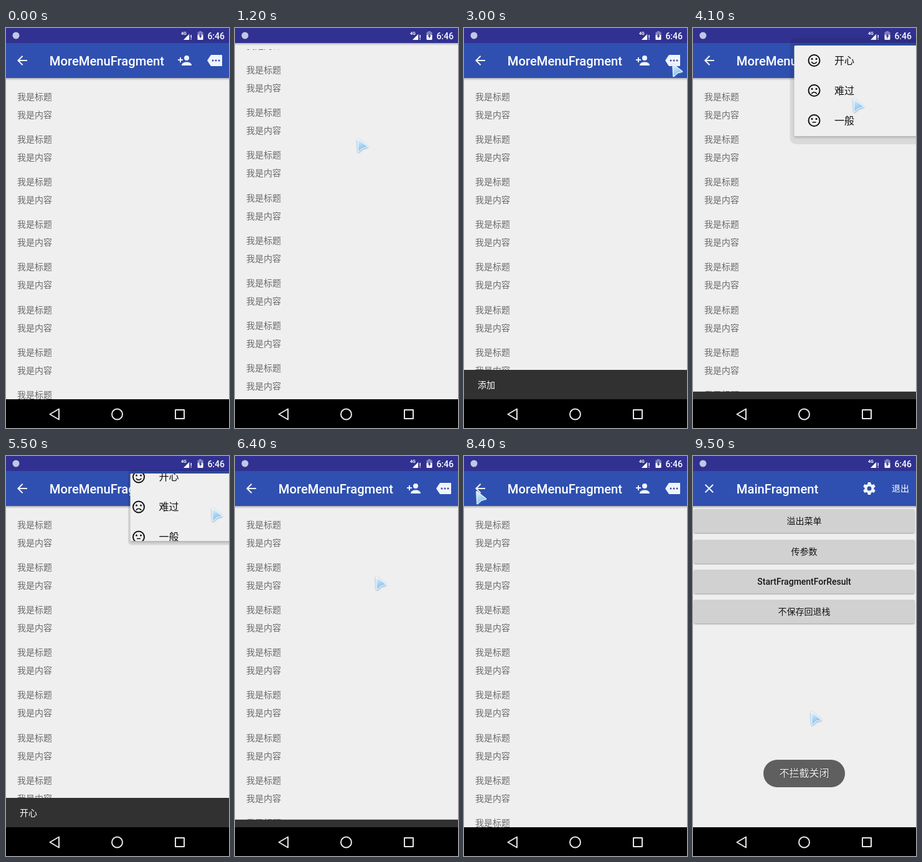
An HTML page with a canvas that plays this animation: 358 px wide and 640 px high, repeating every 9600 ms.

```html
<!DOCTYPE html>
<html lang="zh-CN">
<head>
<meta charset="utf-8">
<style>
html, body { margin: 0; width: 358px; height: 640px; overflow: hidden; background: #000; }
canvas { display: block; }
</style>
</head>
<body>
<canvas id="stage" width="358" height="640"></canvas>
<script>
const g = document.getElementById('stage').getContext('2d');
const LOOP = 9600, STEP = 100;
const FAMILY = 'px Roboto, "Noto Sans CJK SC", "Noto Sans CJK", sans-serif';
const BLUE = '#2f50b0', INDIGO = '#303190', PAPER = '#efefef', LIGHT = '#f1f3fa', INK = '#111';
const BAR = 56, LIST_END = 861, SNACK_HEIGHT = 47;

const MESSAGES = [
  { label: '添加', from: 2400, to: 3900 },
  { label: '开心', from: 4700, to: 6200 },
  { label: '一般', from: 6500, to: 8100 }
];
const MENUS = [{ from: 3800, to: 4700 }, { from: 5500, to: 6200 }];

// Where the pointer rests: arrival, departure, x, y
const STOPS = [
  [100, 300, 200, 430], [1200, 1200, 197, 178], [1800, 1800, 262, 1], [2200, 2400, 281, 53],
  [3000, 3900, 335, 58], [4100, 4200, 258, 114], [4500, 4700, 241, 45], [5200, 5500, 331, 84],
  [5900, 6200, 243, 146], [6800, 7000, 180, 330], [7300, 7500, 173, 226], [8300, 8900, 20, 57],
  [9500, 9600, 190, 410]
];

const span = (t, a, b) => Math.min(1, Math.max(0, (t - a) / (b - a)));
const ease = (t, a, b) => { const u = span(t, a, b); return u * u * (3 - 2 * u); };
// Rises at a, falls at b
const pulse = (t, a, b, rise, fall = rise) => ease(t, a, a + rise) - ease(t, b, b + fall);

const scrollAt = t => LIST_END * pulse(t, 300, 1300, 700, 600) + BAR * pulse(t, 7000, 7500, 300);

function rect(x, y, w, h, color, radius = 0) {
  g.fillStyle = color;
  g.beginPath();
  g.roundRect(x, y, w, h, radius);
  g.fill();
}

function disc(x, y, r, color) {
  g.fillStyle = color;
  g.beginPath();
  g.arc(x, y, r, 0, 7);
  g.fill();
}

function ring(x, y, r) {
  g.beginPath();
  g.arc(x, y, r, 0, 7);
  g.stroke();
}

function line(points, close) {
  g.beginPath();
  points.forEach(([x, y]) => g.lineTo(x, y));
  if (close) g.closePath();
  g.stroke();
}

function poly(points, color) {
  g.fillStyle = color;
  g.beginPath();
  points.forEach(([x, y]) => g.lineTo(x, y));
  g.closePath();
  g.fill();
}

// y is the visual middle; baselines sit on whole pixels
function text(s, x, y, size, color, weight = 400, align = 'left') {
  g.font = weight + ' ' + size + FAMILY;
  g.textAlign = align;
  g.fillStyle = color;
  g.fillText(s, x, Math.floor(y + size * .37));
}

function clipped(x, y, w, h, draw) {
  g.save();
  g.beginPath();
  g.rect(x, y, w, h);
  g.clip();
  draw();
  g.restore();
}

// Icons are drawn around their centre
const ICONS = {
  back() {
    line([[-6, 0], [8, 0]]);
    line([[.7, -7.3], [-6.6, 0], [.7, 7.3]]);
  },
  close() {
    line([[-6.3, -6.3], [6.3, 6.3]]);
    line([[6.3, -6.3], [-6.3, 6.3]]);
  },
  addPerson() {
    line([[-11, -1], [-3, -1]]);
    line([[-7, -5], [-7, 3]]);
    disc(3, -4, 4, LIGHT);
    g.beginPath();
    g.moveTo(-5, 8);
    g.bezierCurveTo(-6, 0.5, 12, 0.5, 11, 8);
    g.fill();
  },
  tag() {
    const shape = [[-10.8, 0], [-5.5, -8], [11, -8], [11, 8], [-5.5, 8]];
    g.lineJoin = 'round';
    poly(shape, LIGHT);
    line(shape, true);
    for (let x = -3; x <= 7; x += 5) disc(x, 0, 1.5, BLUE);
  },
  gear() {
    for (let i = 0; i < 6; i++) {
      poly([[-3, -6], [-2.2, -10], [2.2, -10], [3, -6]], LIGHT);
      g.rotate(Math.PI / 3);
    }
    g.lineWidth = 4;
    ring(0, 0, 5.5);
  }
};

function icon(name, x, y) {
  g.save();
  g.translate(x, y);
  g.strokeStyle = g.fillStyle = LIGHT;
  g.lineWidth = 2;
  g.lineJoin = 'miter';
  ICONS[name]();
  g.restore();
}

function face(x, y, mood) {
  g.strokeStyle = INK;
  g.lineWidth = 2;
  ring(x, y, 9);
  disc(x - 3.5, y - 2.5, 1.5, INK);
  disc(x + 3.5, y - 2.5, 1.5, INK);
  g.lineWidth = 1.6;
  g.beginPath();
  if (mood > 0) g.arc(x, y + .2, 4.6, .45, Math.PI - .45);
  else if (mood < 0) g.arc(x, y + 7.4, 4.6, Math.PI + .45, -.45);
  else { g.moveTo(x - 3, y + 2.8); g.lineTo(x + 3, y + 2.8); }
  g.stroke();
}

function toolbar(top, main) {
  const edge = top + BAR, middle = top + BAR / 2;
  const shade = g.createLinearGradient(0, edge, 0, edge + 4);
  shade.addColorStop(0, 'rgba(0,0,0,.25)');
  shade.addColorStop(1, 'rgba(0,0,0,0)');
  rect(0, edge, 358, 4, shade);
  rect(0, top, 358, BAR, BLUE);
  icon(main ? 'close' : 'back', 26, middle);
  text(main ? 'MainFragment' : 'MoreMenuFragment', 69.8, middle + 1, 20.2, '#fff', 500);
  if (main) {
    icon('gear', 283, middle);
    text('退出', 319, middle, 14, '#fff');
  } else {
    icon('addPerson', 287, middle);
    icon('tag', 335, middle);
  }
}

function listPage(t) {
  const scroll = scrollAt(t), hidden = Math.min(BAR, scroll);
  clipped(0, 90 - hidden, 358, 594, () => {
    for (let i = 0; i < 20; i++) {
      const y = 110 - scroll + i * 68.2;
      text('我是标题', 18, y, 14, '#6c6c6c');
      text('我是内容', 18, y + 29, 14, '#6c6c6c');
    }
  });
  toolbar(24 - hidden, false);
}

function mainPage() {
  ['溢出菜单', '传参数', 'StartFragmentForResult', '不保存回退栈'].forEach((label, i) => {
    const y = Math.floor(85.7 + i * 48.3);
    g.save();
    g.shadowColor = 'rgba(0,0,0,.35)';
    g.shadowBlur = 2;
    g.shadowOffsetY = 1;
    rect(1.5, y, 354, 38, '#d1d1d1', 2);
    g.restore();
    text(label, 178.5, y + 19, 14, '#161616', 500, 'center');
  });
  toolbar(24, true);
}

function statusBar() {
  const dim = '#8485bd';
  rect(0, 0, 358, 24, INDIGO);
  disc(16, 12, 5.5, '#c3c7e4');
  text('4G', 281, 8.5, 7, '#fff', 700);
  poly([[298, 6], [298, 19], [285, 19]], dim);
  poly([[294, 10], [294, 19], [285, 19]], '#fff');
  rect(294.5, 6, 4, 13, INDIGO);
  rect(296.5, 11, 1.4, 5, '#fff');
  rect(296.5, 17, 1.4, 1.6, '#fff');
  rect(310, 5, 4, 2, dim);
  rect(307.5, 6.5, 9, 6, dim, 1);
  rect(307.5, 11, 9, 8, '#fff', 1);
  poly([[313, 8], [309.5, 13.5], [311.6, 13.5], [311.2, 17.5], [314.7, 12], [312.6, 12]], INDIGO);
  text('6:46', 351, 13, 14, '#fff', 500, 'right');
}

function navBar() {
  rect(0, 594, 358, 46, '#000');
  g.strokeStyle = '#e6e6e6';
  g.lineWidth = 2;
  g.lineJoin = 'round';
  line([[70.5, 618], [85, 609.5], [85, 626.5]], true);
  ring(178.5, 618, 8.5);
  g.strokeRect(272, 611, 14, 14);
}

function snackbar(t) {
  for (const { label, from, to } of MESSAGES) {
    const drop = SNACK_HEIGHT * (1 - pulse(t, from, to, 300));
    rect(0, 547 + drop, 358, SNACK_HEIGHT, '#313131');
    text(label, 22, 571 + drop, 14, '#fff');
  }
}

function menu(t) {
  for (const { from, to } of MENUS) {
    if (t < from || t > to + 200) continue;
    const inset = 37 * (1 - span(t, from, from + 150));
    const x = 162.5 + inset, height = 145 - inset, shift = inset / 2;
    const lift = 1 - inset / 74;
    g.save();
    g.globalAlpha = 1 - span(t, to, to + 200);
    rect(x - 7 * lift, 28 - 12 * lift, 260, height + 25 * lift, 'rgba(0,0,0,.09)', 10 * lift);
    g.save();
    g.shadowColor = 'rgba(0,0,0,.22)';
    g.shadowBlur = 4;
    g.shadowOffsetY = 2;
    rect(x, 28, 240, height, PAPER, 2);
    g.restore();
    clipped(x, 28, 240, height, () => {
      ['开心', '难过', '一般'].forEach((label, i) => {
        const y = 52 + i * 48 - shift;
        face(194.5 + shift, y, [1, -1, 0][i]);
        text(label, 227 + shift, y + .5, 16, INK);
      });
    });
    g.restore();
  }
}

function toast(t) {
  g.save();
  g.globalAlpha = span(t, 8900, 9200);
  rect(113, 486, 131, 44, '#5f5f5f', 22);
  g.shadowColor = 'rgba(0,0,0,.6)';
  g.shadowBlur = 2;
  text('不拦截关闭', 178.5, 508, 16, '#f2f2f2', 400, 'center');
  g.restore();
}

function pointer(t) {
  if (t < STOPS[0][0]) return;
  const i = Math.max(1, STOPS.findIndex(stop => t <= stop[0]));
  const [, leave, x0, y0] = STOPS[i - 1], [arrive, , x1, y1] = STOPS[i];
  const u = ease(t, leave, arrive);
  g.save();
  g.translate(x0 + (x1 - x0) * u - .5, y0 + (y1 - y0) * u - .8);
  const fill = g.createLinearGradient(2, 2, 10, 18);
  fill.addColorStop(0, '#d9effc');
  fill.addColorStop(1, '#7fbdea');
  const shape = [[1, 1], [15.5, 12.5], [8, 14.5], [2, 20]];
  g.lineJoin = 'round';
  g.lineWidth = 2.4;
  g.strokeStyle = '#f4faff';
  g.shadowColor = 'rgba(70,130,190,.75)';
  g.shadowBlur = 3;
  g.shadowOffsetY = 1;
  line(shape, true);
  g.shadowColor = 'transparent';
  poly(shape, fill);
  g.restore();
}

function frame(now) {
  const t = Math.floor(now % LOOP / STEP) * STEP;
  rect(0, 0, 358, 640, PAPER);
  if (t < 8500) listPage(t); else mainPage();
  statusBar();
  snackbar(t);
  navBar();
  menu(t);
  toast(t);
  pointer(t);
  requestAnimationFrame(frame);
}
requestAnimationFrame(frame);
</script>
</body>
</html>
```
